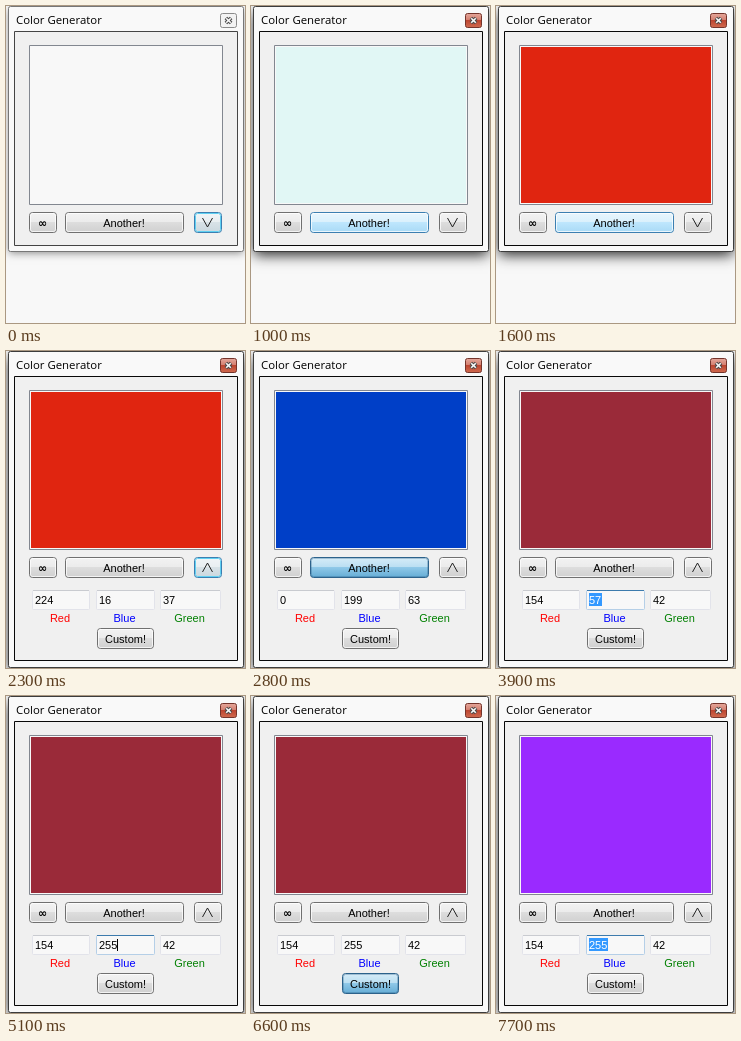
These frames come from a looping animation (239 px wide and 317 px high, 8 s). An HTML page with a canvas:

```html
<!DOCTYPE html>
<html lang="en">
<head>
<meta charset="utf-8">
<title>Color Generator</title>
<style>
  html, body { margin: 0; width: 100%; height: 100%; overflow: hidden; background: #f8f8f8; }
  canvas { display: block; width: 239px; height: 317px; }
</style>
</head>
<body>
<canvas id="stage"></canvas>
<script>
const W = 239, H = 317, LOOP = 8000;
const canvas = document.getElementById('stage');
const ratio = window.devicePixelRatio || 1;
canvas.width = Math.round(W * ratio);
canvas.height = Math.round(H * ratio);
const ctx = canvas.getContext('2d');
const UI = '"Liberation Sans", Arial, sans-serif';

const START = {
  active: false, open: false, color: null,
  another: 'normal', toggle: 'focus', custom: 'normal',
  red: 'normal', blue: 'normal', blueText: null, caret: false, selected: false
};

// Each step adds its changes to the state before it. Colors are r, g, b.
const STEPS = [
  [400, { another: 'hover' }],
  [600, { active: true, another: 'press', toggle: 'normal' }],
  [700, { another: 'hover', color: [126, 170, 92] }],
  [1000, { color: [225, 247, 245] }],
  [1300, { color: [92, 128, 176] }],
  [1500, { another: 'press' }],
  [1600, { another: 'hover', color: [224, 37, 16] }],
  [1900, { another: 'normal', toggle: 'hover' }],
  [2000, { toggle: 'press' }],
  [2100, { toggle: 'hover', open: true }],
  [2300, { toggle: 'focus' }],
  [2500, { another: 'hover' }],
  [2600, { another: 'press', toggle: 'normal', color: [118, 201, 87] }],
  [2800, { color: [0, 63, 199] }],
  [2900, { color: [203, 120, 64] }],
  [3000, { color: [88, 164, 151] }],
  [3100, { color: [172, 82, 190] }],
  [3200, { color: [96, 145, 68] }],
  [3300, { color: [191, 240, 194] }],
  [3400, { color: [154, 42, 57] }],
  [3600, { another: 'hover' }],
  [3700, { another: 'normal', blue: 'hover' }],
  [3800, { blue: 'focus', caret: true }],
  [3900, { caret: false, selected: true }],
  [4100, { red: 'hover' }],
  [4300, { red: 'normal' }],
  [4700, { selected: false, blueText: '', caret: true }],
  [4800, { blueText: '2' }],
  [5000, { blueText: '25' }],
  [5100, { blueText: '255' }],
  [5500, { caret: false }],
  [5600, { red: 'hover' }],
  [5800, { red: 'normal' }],
  [6100, { caret: true }],
  [6400, { custom: 'hover' }],
  [6600, { custom: 'press', blue: 'normal', caret: false }],
  [6700, { color: [154, 42, 255] }],
  [6800, { custom: 'hover' }],
  [7200, { custom: 'focus' }],
  [7400, { blue: 'hover' }],
  [7500, { blue: 'focus', custom: 'normal', caret: true }],
  [7700, { caret: false, selected: true }]
];

// border, then the four stops of the glossy face
const FACES = {
  normal: ['#707070', '#f3f3f3', '#ebebeb', '#dddddd', '#cfcfcf'],
  focus: ['#3c7fb1', '#f1f5f7', '#e8eef1', '#d8e2e7', '#c9d7de'],
  hover: ['#3c7fb1', '#eaf6fd', '#d9f0fc', '#bee6fd', '#a7d9f5'],
  press: ['#2c628b', '#d8edf8', '#b9def2', '#8fc8e8', '#62abd4']
};
// top edge, other edges
const EDGES = {
  normal: ['#c9cbd0', '#e2e3ea'],
  hover: ['#5794bf', '#b7d5ea'],
  focus: ['#3d7bad', '#b5cfe7']
};

function rect(x, y, w, h, fill) {
  ctx.fillStyle = fill;
  ctx.fillRect(x, y, w, h);
}

function box(x, y, w, h, stroke, radius = 0, fill = null) {
  ctx.beginPath();
  ctx.roundRect(x + .5, y + .5, w - 1, h - 1, radius);
  if (fill) { ctx.fillStyle = fill; ctx.fill(); }
  ctx.strokeStyle = stroke;
  ctx.lineWidth = 1;
  ctx.stroke();
}

function line(points, color, width) {
  ctx.beginPath();
  points.forEach(([x, y]) => ctx.lineTo(x, y));
  ctx.strokeStyle = color;
  ctx.lineWidth = width;
  ctx.stroke();
}

function text(str, x, y, color = '#000', align = 'left', font = '11px ' + UI) {
  ctx.font = font;
  ctx.textAlign = align;
  ctx.fillStyle = color;
  ctx.fillText(str, x, y);
}

function gloss(y, h, [a, b, c, d]) {
  const g = ctx.createLinearGradient(0, y, 0, y + h);
  [[0, a], [.5, b], [.5, c], [1, d]].forEach(stop => g.addColorStop(...stop));
  return g;
}

function button(x, y, w, h, look) {
  const [edge, ...stops] = FACES[look];
  box(x, y, w, h, edge, 3, gloss(y, h, stops));
  const inner = { press: 'rgba(40,90,130,.3)', focus: '#5fd0f2' }[look] || 'rgba(255,255,255,.75)';
  box(x + 1, y + 1, w - 2, h - 2, inner, 2);
}

function field(x, w, look, value, label, color) {
  const [top, side] = EDGES[look];
  box(x, 239, w, 20, side, 1, '#f8f8f8');
  rect(x + 1, 239, w - 2, 1, top);
  text(value, x + 3, 253);
  text(label, x + w / 2 - 1, 271, color, 'center');
}

function drawWindow(s) {
  const height = s.open ? 316 : 245;
  ctx.save();
  ctx.shadowColor = s.active ? 'rgba(0,0,0,.85)' : 'rgba(0,0,0,.45)';
  ctx.shadowBlur = (s.active ? 13 : 8) * ratio;
  ctx.shadowOffsetY = (s.active ? 4 : 2) * ratio;
  rect(3, 2, 234, height - 2, '#f9f9f9');
  ctx.restore();
  box(2, 0, 236, height + 1, s.active ? '#3c3c3c' : '#777', 2, '#f9f9f9');
  box(8, 25, 224, s.open ? 285 : 215, s.active ? '#080808' : '#444', 0, '#f0f0f0');
  text('Color Generator', 10, 18, '#000', 'left', '11.4px "Open Sans", "Noto Sans", sans-serif');

  const close = s.active
    ? gloss(7, 15, ['#e5aa9e', '#d47d6d', '#bd4631', '#d16c50'])
    : '#f3f3f3';
  box(214, 7, 17, 15, s.active ? '#74342b' : '#8b8b8b', 2, close);
  [['#4a4a4a', 3.6, 2.6], ['#fafafa', 1.6, 2.3]].forEach(([color, width, r]) => {
    line([[222.5 - r, 14.5 - r], [222.5 + r, 14.5 + r]], color, width);
    line([[222.5 + r, 14.5 - r], [222.5 - r, 14.5 + r]], color, width);
  });
}

function drawFields(s) {
  const [r, g, b] = s.color;
  field(26, 58, s.red, r, 'Red', '#f00');
  field(90, 59, s.blue, s.blueText ?? b, 'Blue', '#00f');
  field(154, 61, 'normal', g, 'Green', '#008000');

  const value = String(s.blueText ?? b);
  ctx.font = '11px ' + UI;
  const width = Math.round(ctx.measureText(value).width);
  if (s.selected) {
    rect(93, 242, width + 1, 13, '#3399ff');
    text(value, 93, 253, '#fff');
  }
  if (s.caret) rect(93 + width, 243, 1, 12, '#000');

  button(91, 277, 57, 21, s.custom);
  text('Custom!', 119.5, 292, '#000', 'center');
}

function draw(s) {
  ctx.setTransform(ratio, 0, 0, ratio, 0, 0);
  rect(0, 0, W, H, '#f8f8f8');
  drawWindow(s);

  box(23, 39, 194, 160, '#828790', 0, '#f8f8f8');
  if (s.color) rect(25, 41, 190, 156, `rgb(${s.color})`);

  button(23, 206, 28, 21, 'normal');
  text('∞', 36.5, 221, '#000', 'center', 'bold 11px "DejaVu Sans", sans-serif');
  button(59, 206, 119, 21, s.another);
  text('Another!', 118, 221, '#000', 'center');
  button(188, 206, 28, 21, s.toggle);
  const [ends, tip] = s.open ? [221, 212] : [212, 221];
  line([[196.5, ends], [201.5, tip], [206.5, ends]], '#222', 1);

  if (s.open) drawFields(s);
}

function stateAt(time) {
  const passed = STEPS.filter(([at]) => at <= time).map(([, change]) => change);
  return Object.assign({}, START, ...passed);
}

const begin = performance.now();
function tick() {
  draw(stateAt((performance.now() - begin) % LOOP));
  requestAnimationFrame(tick);
}
tick();
</script>
</body>
</html>
```
